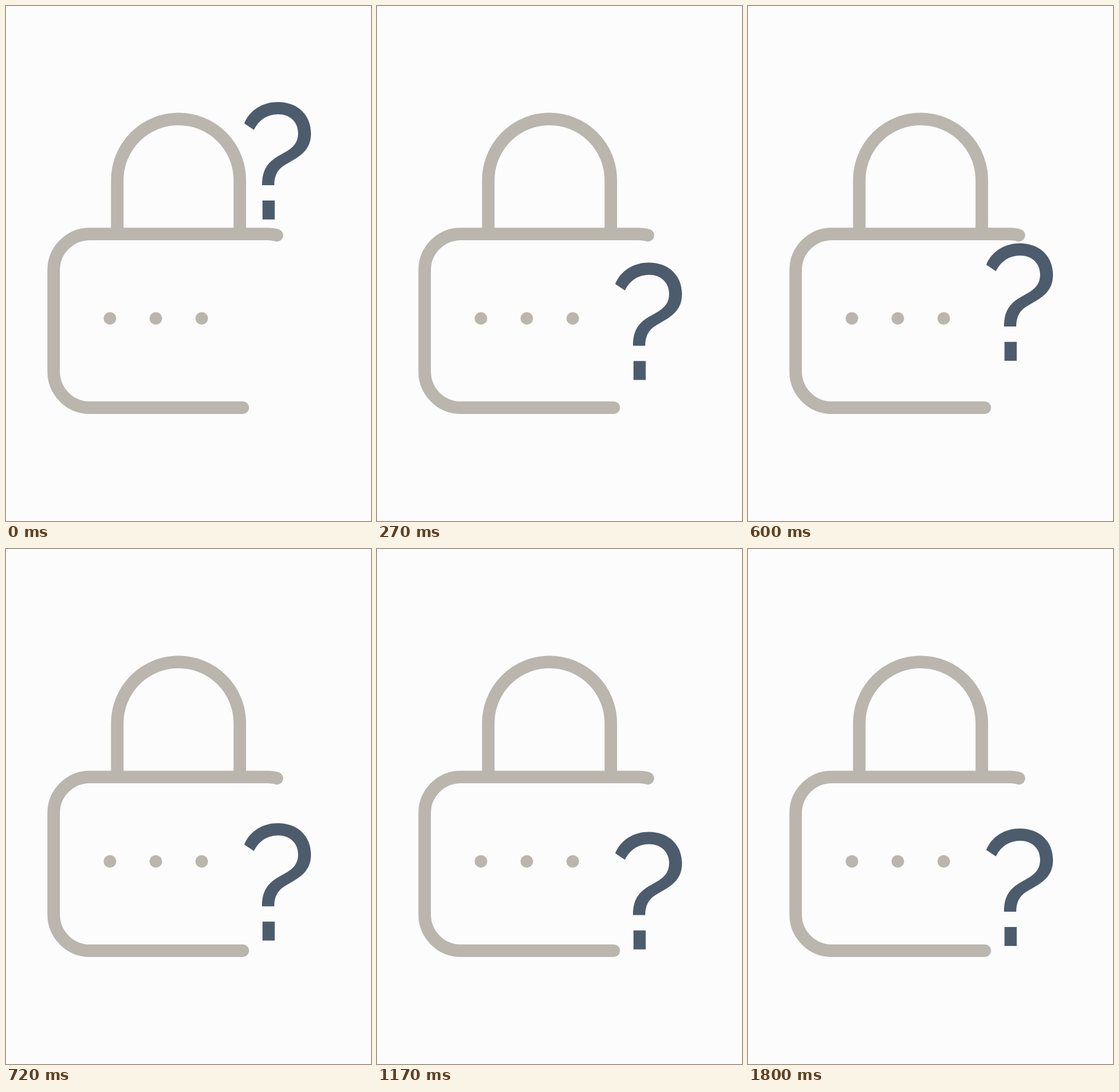
An HTML page that plays this animation: 596 px wide and 842 px high, repeating every 1830 ms.

```html
<!DOCTYPE html>
<html lang="en">
<head>
<meta charset="utf-8">
<title>Bouncing question mark</title>
<style>
  html, body { margin: 0; width: 100%; height: 100%; overflow: hidden; background: #fcfcfc; }
  svg { display: block; width: 100%; height: 100%; }
</style>
</head>
<body>
<svg viewBox="0 0 596 842">
  <g fill="none" stroke="#bab5ad" stroke-width="20.4">
    <path d="M181.7 372.7V284.8A100.05 100.05 0 0 1 381.8 284.8V372.7"/>
    <path stroke-linecap="round" d="M442.4 374.9Q436 372.7 427 372.7H137A59.2 59.2 0 0 0 77.8 431.9V597.6A59.2 59.2 0 0 0 137 656.8H386.7"/>
  </g>
  <g fill="#bab5ad">
    <circle cx="169.7" cy="510.8" r="10.3"/>
    <circle cx="244.6" cy="510.8" r="10.3"/>
    <circle cx="319.6" cy="510.8" r="10.3"/>
  </g>
  <g id="mark" fill="#4c5c6d">
    <path d="M389 192C398 170 419 157 444 157C476 157 498 178 498 208.5C498 228 489 241 467 253L456 259.5C443 267 438 278 438 293H418C418 268 427 255 447 244L460 236.5C472 229 477 220 477 208C477 190 464 177 444 177C427 177 413 186 404.7 202.5Z"/>
    <path d="M418.8 318H438.8V349H418.8Z"/>
  </g>
</svg>
<script>
  const LOOP = 1830, STEP = 30, HALF = 225, FLOOR = 320;
  const mark = document.getElementById('mark');

  // Parabolic bounces of equal length; each peak is half as high as the last.
  function drop(t) {
    const peak = Math.round(t / (2 * HALF));
    const phase = (t - peak * 2 * HALF) / HALF;
    return FLOOR - FLOOR / 2 ** peak * (1 - phase * phase);
  }

  function render(time) {
    const t = Math.floor((time % LOOP) / STEP) * STEP;
    mark.setAttribute('transform', `translate(0 ${drop(t).toFixed(2)})`);
  }

  const start = performance.now();
  function tick() {
    render(performance.now() - start);
    requestAnimationFrame(tick);
  }
  tick();
</script>
</body>
</html>
```
